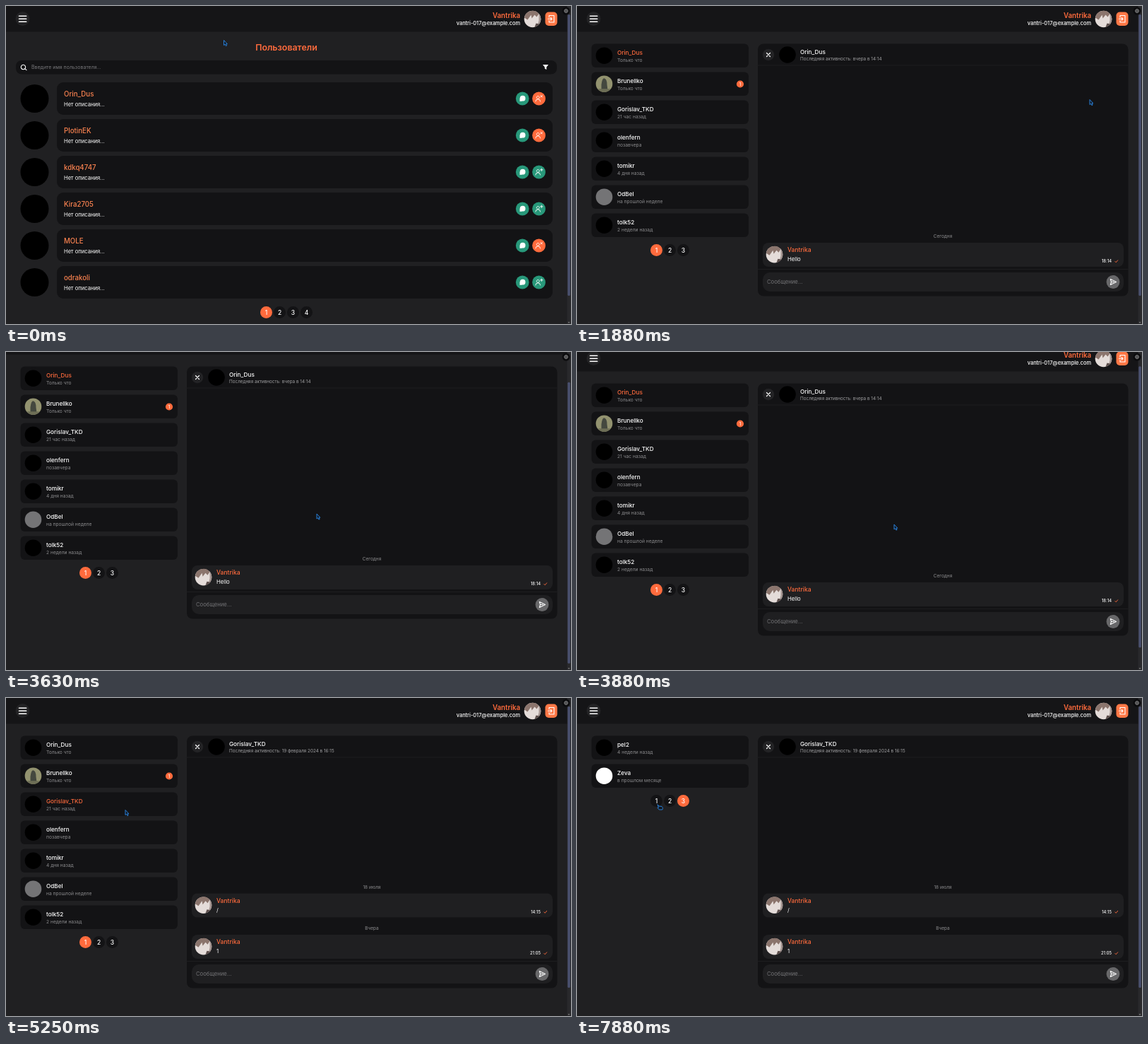
These frames come from a looping animation (800 px wide and 450 px high, 8000 ms). An HTML page:

```html
<!DOCTYPE html>
<html lang="ru">
<head>
<meta charset="utf-8">
<style>
  html, body { margin: 0; width: 100%; height: 100%; overflow: hidden; background: #202022; }
  svg { display: block; width: 800px; height: 450px; font-family: Inter, "Open Sans", sans-serif; }
</style>
</head>
<body>
<svg viewBox="0 0 800 450">
  <rect width="800" height="450" fill="#202022"/>
  <g id="page"></g>
  <rect x="794.5" width="5.5" height="450" fill="#29292c"/>
  <rect id="thumb" x="795.3" y="12" width="3.500" height="398" rx="1.5" fill="#4a5170"/>
  <path d="M795.500 447h3l-1.500 2z" fill="#777"/>
  <circle cx="793" cy="7" r="5.500" fill="#0c0c0e"/>
  <circle cx="793" cy="7" r="2.300" fill="none" stroke="#ccc" stroke-width=".8"/>
  <circle cx="793" cy="7" r=".8" fill="#ccc"/>
  <g id="cursor" fill="#10151c" stroke="#2980d9" stroke-linejoin="round">
    <path id="arrow" d="M.5 .5V7.500L2.200 6.200L3.400 8.600L4.600 8L3.500 5.700H5.300Z"/>
    <path id="hand" d="M.5 .7L2.500 3L6.500 3.500L8 5.500L7.300 8H2.800L.5 5.300L2 5Z"/>
  </g>
</svg>
<script>
const LOOP = 8000, STEP = 125;
const CORAL = '#ff6b3d', NAME = '#fb8350', GREEN = '#28987a', DARK = '#131315', GREY = '#8c8c8e';
const ME = 'Vantrika', ORIN = 'Orin_Dus', GORISLAV = 'Gorislav_TKD';
const $ = id => document.getElementById(id);

const text = (x, y, str, size, fill = '#fff', weight = 400, anchor = 'start') =>
  `<text x="${x}" y="${y}" font-size="${size}" fill="${fill}" font-weight="${weight}" text-anchor="${anchor}">${str}</text>`;
const rect = (x, y, w, h, r, fill) =>
  `<rect x="${x}" y="${y}" width="${w}" height="${h}" rx="${r}" fill="${fill}"/>`;
const dot = (x, y, r, fill) => `<circle cx="${x}" cy="${y}" r="${r}" fill="${fill}"/>`;
const at = (x, y, body) => `<g transform="translate(${x} ${y})">${body}</g>`;
const line = (d, width = 1, color = '#fff') =>
  `<path d="${d}" fill="none" stroke="${color}" stroke-width="${width}" stroke-linecap="round" stroke-linejoin="round"/>`;
const shape = (d, fill) => `<path d="${d}" fill="${fill}"/>`;

const avatars = {
  none: dot(0, 0, 11.8, '#000'),
  me: dot(0, 0, 11.8, '#e4dcd9') +
    shape('M-11.600 -2A11.800 11.800 0 0 1 9 -7.600L6 -3L3 -6L-1 -1L-2 -6L-7 1Z', '#8b756d') +
    shape('M9 -7.600A11.800 11.800 0 0 1 7 9.500L9 2Z', '#a39490') +
    shape('M3 11.400A11.800 11.800 0 0 0 9.500 7L5 6Z', '#5b4d4b'),
  statue: dot(0, 0, 11.8, '#92926f') + shape('M-4 10V1Q-3 -8 0 -8Q4 -7 4 1L5 9Z', '#44483f') +
    shape('M-9 7H9Q5 11.800 0 11.800Q-5 11.800 -9 7Z', '#6d6e56'),
  grey: dot(0, 0, 11.8, '#747476'),
  pale: dot(0, 0, 11.8, '#c9c9c9'),
  white: dot(0, 0, 11.8, '#fff')
};
const avatar = (x, y, kind = 'none') => at(x, y, avatars[kind]);

const pager = (x, y, count, active) => Array.from({ length: count }, (_, i) =>
  dot(x + 19 * i, y, 8.5, i + 1 === active ? CORAL : DARK) +
  text(x + 19 * i, y + 3, i + 1, 8.5, '#fff', 500, 'middle')).join('');

const header = () => rect(0, -1, 795, 37.5, 0, '#151517') + dot(23.5, 18, 10, '#232325') +
  line('M18.500 14.200H28.700M18.500 18.200H28.700M18.500 22.200H28.700', 1.6) +
  text(728, 17, ME, 9.7, CORAL, 600, 'end') +
  text(728, 27, 'vantri-017@example.com', 7.4, '#fff', 500, 'end') +
  avatar(745.5, 18.5, 'me') + rect(763.5, 8.5, 17, 19.5, 5, '#ff7846') +
  line('M769 16V13.500H776V23H769V20.500M767.500 18.300H773M771.300 16.500L773 18.300L771.300 20.100', 1.1);

const users = [[ORIN, 1], ['PlotinEK', 1], ['kdkq4747', 0], ['Kira2705', 0], ['MOLE', 1], ['odrakoli', 0]];

const userRow = ([name, friend], i) => at(0, 52 * i,
  dot(40.5, 131, 20, '#000') + rect(72, 108, 702, 46, 9, DARK) +
  text(82, 128, name, 9.7, NAME, 500) + text(82, 141.5, 'Нет описания...', 7.6) +
  dot(731.2, 131, 9.4, GREEN) + dot(731.6, 130.7, 3.9, '#fff') + shape('M727.500 135V130.500L731 134.500Z', '#fff') +
  dot(754.5, 131, 9.4, friend ? CORAL : GREEN) +
  line('M749.800 135Q750 131.800 753.200 131.800Q756.400 131.800 756.600 135M753.200 131.500a2 2 0 1 1 .1 0', .9) +
  line(friend ? 'M757 126.500l2.400 2.400m0 -2.400l-2.400 2.400' : 'M756.600 127.800h3.400m-1.700 -1.700v3.400', .9));

const usersPage = () => text(397, 63, 'Пользователи', 12.4, CORAL, 600, 'middle') +
  rect(14, 77, 766, 19.5, 8, DARK) + line('M27.600 89.300L29 90.700M24.500 83.300a3.200 3.200 0 1 1 -.1 0', 1.1) +
  text(36, 89.2, 'Введите имя пользователя...', 7, '#77777a') +
  shape('M760 83H768L765.300 86.500V90L762.800 88.500V86.500Z', '#fff') +
  users.map(userRow).join('') + pager(368.5, 433.5, 4, 1);

const weeks = '3 недели назад';
const dialogs = [
  [[ORIN, 'Только что'], ['Brunellko', 'Только что', 'statue', 1], [GORISLAV, '21 час назад'],
   ['olenfern', 'позавчера'], ['tomikr', '4 дня назад'], ['OdBel', 'на прошлой неделе', 'grey'], ['tolk52', '2 недели назад']],
  [['kovylinzakhary63', '2 недели назад'], ['css_drummer', weeks], ['mtpalvinchik', weeks], ['Ryo', weeks, 'pale'],
   ['pelusa2ok', weeks], ['pelusa2', weeks], ['Krapivo4007', weeks]],
  [['pel2', '4 недели назад'], ['Zeva', 'в прошлом месяце', 'white']]
];

const chats = {
  [ORIN]: { seen: 'вчера в 14:14', messages: [['Сегодня', 'Hello', '18:14']] },
  [GORISLAV]: { seen: '19 февраля 2024 в 16:15', messages: [['18 июля', '/', '14:15'], ['Вчера', '1', '21:05']] }
};

const dialogRow = open => ([name, when, face, unread], i) => at(0, 40 * i,
  rect(20.5, 53.5, 222.5, 33.5, 6, DARK) + avatar(38.5, 70.2, face) +
  text(57, 69, name, 8.2, name === open ? CORAL : '#fff', 500) + text(57, 79, when, 6.7, GREY) +
  (unread ? dot(231, 70.5, 5.1, CORAL) + text(231, 73, unread, 6.8, '#fff', 400, 'middle') : ''));

const message = ([day, body, time], y) => at(0, y,
  text(518, 328.3, day, 6.5, GREY, 400, 'middle') + rect(263, 335, 511, 34, 8, '#1f1f21') +
  avatar(279.5, 351.7, 'me') + text(298, 348, ME, 8.5, CORAL, 500) + text(298, 361, body, 7.8) +
  text(757, 363, time, 5.8, '#fff', 500, 'end') + line('M761.800 361.400L763.200 362.800L765.700 359.800', .9, CORAL));

function chatPage(open, page) {
  const list = dialogs[page - 1], { seen, messages } = chats[open];
  return list.map(dialogRow(open)).join('') + pager(112.5, 65.5 + 40 * list.length, 3, page) +
    rect(256, 53.5, 524.5, 357, 8, DARK) + rect(256, 83.5, 524.5, 1, 0, '#1e1e20') +
    dot(271, 69, 8.2, '#232325') + line('M268.500 66.500l5 5m0 -5l-5 5', 1.2) + avatar(298, 69) +
    text(316, 68, open, 8.2, '#fff', 500) + text(316, 76.5, 'Последняя активность: ' + seen, 6.35, '#a0a0a2') +
    messages.map((m, i) => message(m, 58.5 * (i + 1 - messages.length))).join('') +
    rect(256, 372, 524.5, 1, 0, '#1e1e20') + rect(263, 377, 511, 27, 10, '#1f1f21') +
    text(269, 393.3, 'Сообщение...', 7.7, '#737376') + dot(759, 390.5, 9.4, '#68686a') +
    line('M755.300 386.500L763.500 390.500L755.300 394.500L756.500 390.500ZM756.500 390.500H760', 1.1);
}

// Smooth interpolation over [time, ...values]
function track(keys, t) {
  const i = keys.findIndex(k => k[0] > t);
  if (i < 0) return keys[keys.length - 1].slice(1);
  const a = keys[i - 1], b = keys[i], u = (t - a[0]) / (b[0] - a[0]), e = u * u * (3 - 2 * u);
  return a.slice(1).map((v, j) => v + (b[j + 1] - v) * e);
}

const cursorPath = [[0, 308, 48], [1125, 726, 130], [1375, 726, 130], [1875, 725.5, 132], [2125, 724, 133],
  [2750, 356, 188], [3250, 423, 201], [3875, 448.5, 243.5], [4250, 445, 240], [4875, 170, 158], [5250, 168.5, 158],
  [5500, 167, 162], [6000, 130, 343], [6250, 130, 343], [6625, 152, 343.5], [7000, 152, 343.5], [7875, 113.5, 150]];
const scrollPath = [[0, 0], [3250, 0], [3500, 33], [3625, 33], [3875, 9], [4000, 0]];
const handTimes = [[1000, 1375], [5875, 7000], [7750, LOOP]];

let shown;
function render(now) {
  const t = Math.floor(now % LOOP / STEP) * STEP;
  const open = t < 1375 ? '' : t < 5000 ? ORIN : GORISLAV;
  const page = t < 6125 ? 1 : t < 7000 ? 2 : 3;
  if (shown !== open + page) {
    shown = open + page;
    $('page').innerHTML = header() + (open ? chatPage(open, page) : usersPage());
  }
  const [scroll] = track(scrollPath, t);
  $('page').setAttribute('transform', `translate(0 ${-scroll})`);
  $('thumb').setAttribute('y', 12 + scroll * .93);
  $('cursor').setAttribute('transform', `translate(${track(cursorPath, t).join(' ')})`);
  const hand = handTimes.some(([from, to]) => t >= from && t < to);
  $('hand').style.display = hand ? '' : 'none';
  $('arrow').style.display = hand ? 'none' : '';
}

const start = performance.now();
(function frame() {
  render(performance.now() - start);
  requestAnimationFrame(frame);
})();
</script>
</body>
</html>
```
